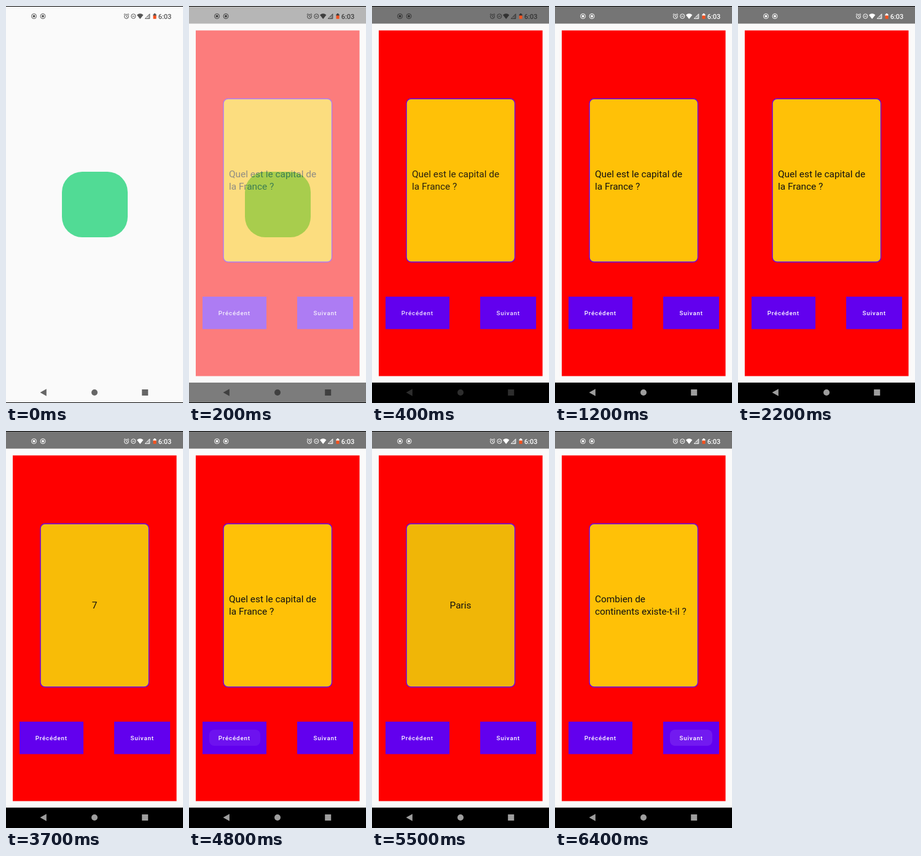
An HTML page for the animation above (6500 ms loop, 288 by 642 pixels).

```html
<!DOCTYPE html>
<html lang="fr">
<head>
<meta charset="utf-8">
<title>Cartes de questions</title>
<style>
  html, body { margin: 0; width: 100%; height: 100%; overflow: hidden; background: #fafafa; }
  svg { display: block; width: 100vw; height: 100vh; }
  text { font-family: Roboto, "Noto Sans", sans-serif; }
  .card { font-size: 15.4px; fill: #111; }
  .label { font-size: 9.8px; font-weight: 500; letter-spacing: .82px; fill: #fff; }
  .clock { font-size: 11px; font-weight: 500; fill: currentColor; }
  .line { fill: none; stroke: currentColor; }
  .solid { fill: currentColor; }
</style>
</head>
<body>
<svg viewBox="0 0 288 642" preserveAspectRatio="none">
  <defs>
    <clipPath id="prevClip"><rect x="33" y="483" width="83" height="26" rx="8"/></clipPath>
    <clipPath id="nextClip"><rect x="187" y="483" width="69" height="26" rx="8"/></clipPath>
  </defs>
  <rect width="288" height="642" fill="#fafafa"/>
  <rect x="91" y="268" width="107" height="106" rx="33" fill="#51db95"/>

  <g id="app">
    <rect width="288" height="642" fill="#fafafa"/>
    <rect width="288" height="28.5" fill="#757575"/>
    <rect y="609" width="288" height="33" fill="#000"/>
    <rect x="11" y="39.5" width="266.5" height="559" fill="#f00"/>
    <rect x="56" y="150" width="176.5" height="264" rx="7.5" fill="#ffc107"/>
    <rect id="tint" x="56" y="150" width="176.5" height="264" rx="7.5" fill="#000"/>
    <rect x="56" y="150" width="176.5" height="264" rx="7.5" fill="none" stroke="#6200ee" stroke-width="1.4"/>
    <g class="card" id="words">
      <g data-side="france"><text x="65" y="277">Quel est le capital de</text><text x="65" y="297">la France ?</text></g>
      <g data-side="continents"><text x="65" y="277">Combien de</text><text x="65" y="297">continents existe-t-il ?</text></g>
      <text data-side="seven" x="144" y="287.3" text-anchor="middle">7</text>
      <text data-side="paris" x="144" y="287.3" text-anchor="middle">Paris</text>
    </g>
    <rect x="22" y="470" width="104" height="52.5" fill="#6200ee"/>
    <rect x="176" y="470" width="91" height="52.5" fill="#6200ee"/>
    <g clip-path="url(#prevClip)"><circle id="prevRipple" cx="74" cy="496" fill="#fff"/></g>
    <g clip-path="url(#nextClip)"><circle id="nextRipple" cx="221" cy="496" fill="#fff"/></g>
    <g id="labels">
      <text class="label" x="47.7" y="499.7">Précédent</text>
      <text class="label" x="202.5" y="499.7">Suivant</text>
    </g>
  </g>

  <g id="status">
    <g id="records">
      <circle class="line" cx="45.5" cy="16.5" r="4"/><circle class="solid" cx="45.5" cy="16.5" r="2"/>
      <circle class="line" cx="60" cy="16.5" r="4"/><circle class="solid" cx="60" cy="16.5" r="2"/>
    </g>
    <circle class="line" cx="196" cy="17" r="3.4"/>
    <path class="line" d="M196 15v2.3l1.6 1M191.8 14l2-1.8M200.2 14l-2-1.8"/>
    <circle class="line" cx="207.3" cy="16.5" r="3.6"/>
    <path class="line" d="M205.4 16.5h3.8"/>
    <path class="solid" d="M213 14.6q5.2-4.6 10.4 0l-5.2 6.4z"/>
    <path class="line" d="M226.4 20.4h7.4v-7.6z"/>
    <path class="solid" d="M230 20.4v-3.8l3.8-3.8v7.6z" opacity=".35"/>
    <path class="solid" d="M239.5 13.2h1.3v-1.1h2.4v1.1h1.3v3h-5z"/>
    <rect x="239.5" y="15.4" width="5" height="5.4" fill="#f4511e"/>
    <text class="clock" x="247.7" y="20.6">6:03</text>
  </g>
  <g id="nav" class="solid">
    <path d="M55.5 625L65.8 619.2V630.8z"/>
    <circle cx="144" cy="625" r="5"/>
    <rect x="221.2" y="620" width="10" height="10"/>
  </g>
  <path d="M0 .5H288M0 641.5H288" stroke="#000"/>
</svg>
<script>
const LOOP = 6500;
const $ = id => document.getElementById(id);

// Each row is [time, value]; values between rows are linear.
const tracks = {
  app: [[50, 0], [350, 1]],
  ink: [[400, .9], [700, 1]],
  status: [[0, 85], [300, 50], [420, 50], [700, 255]],
  nav: [[0, 102], [300, 45], [420, 45], [800, 158]],
  tint: [[3550, 0], [3600, .045], [3700, .028], [3920, 0],
         [5080, 0], [5180, .06], [5500, .06], [5900, 0]]
};

const sides = [[0, "france"], [2450, "continents"], [3600, "seven"],
               [4500, "france"], [5250, "paris"], [6200, "continents"]];

const taps = { prev: [4400], next: [2400, 6100] };

const clamp = x => Math.min(1, Math.max(0, x));

function at(track, t) {
  const i = track.findIndex(row => row[0] > t);
  if (i < 0) return track[track.length - 1][1];
  if (i === 0) return track[0][1];
  const [t0, a] = track[i - 1], [t1, b] = track[i];
  return a + (b - a) * (t - t0) / (t1 - t0);
}

function ripple(name, t) {
  const start = taps[name].filter(s => s <= t).pop();
  const age = start === undefined ? 1e4 : t - start;
  const circle = $(name + "Ripple");
  circle.setAttribute("r", 8 + 40 * (1 - (1 - clamp(age / 230)) ** 2));
  circle.setAttribute("opacity", .1 * clamp(age / 80) * (1 - clamp((age - 330) / 230)));
}

function gray(id, level) {
  const v = Math.round(level);
  $(id).style.color = `rgb(${v},${v},${v})`;
}

function draw(now) {
  const t = now % LOOP;
  $("app").setAttribute("opacity", at(tracks.app, t));
  $("tint").setAttribute("opacity", at(tracks.tint, t));
  $("words").setAttribute("opacity", at(tracks.ink, t));
  $("labels").setAttribute("opacity", at(tracks.ink, t));
  gray("status", at(tracks.status, t));
  gray("nav", at(tracks.nav, t));
  const side = sides.filter(row => row[0] <= t).pop()[1];
  for (const el of $("words").children)
    el.style.display = el.dataset.side === side ? "" : "none";
  ripple("prev", t);
  ripple("next", t);
}

const begin = performance.now();
function tick() {
  draw(performance.now() - begin);
  requestAnimationFrame(tick);
}
tick();
</script>
</body>
</html>
```
